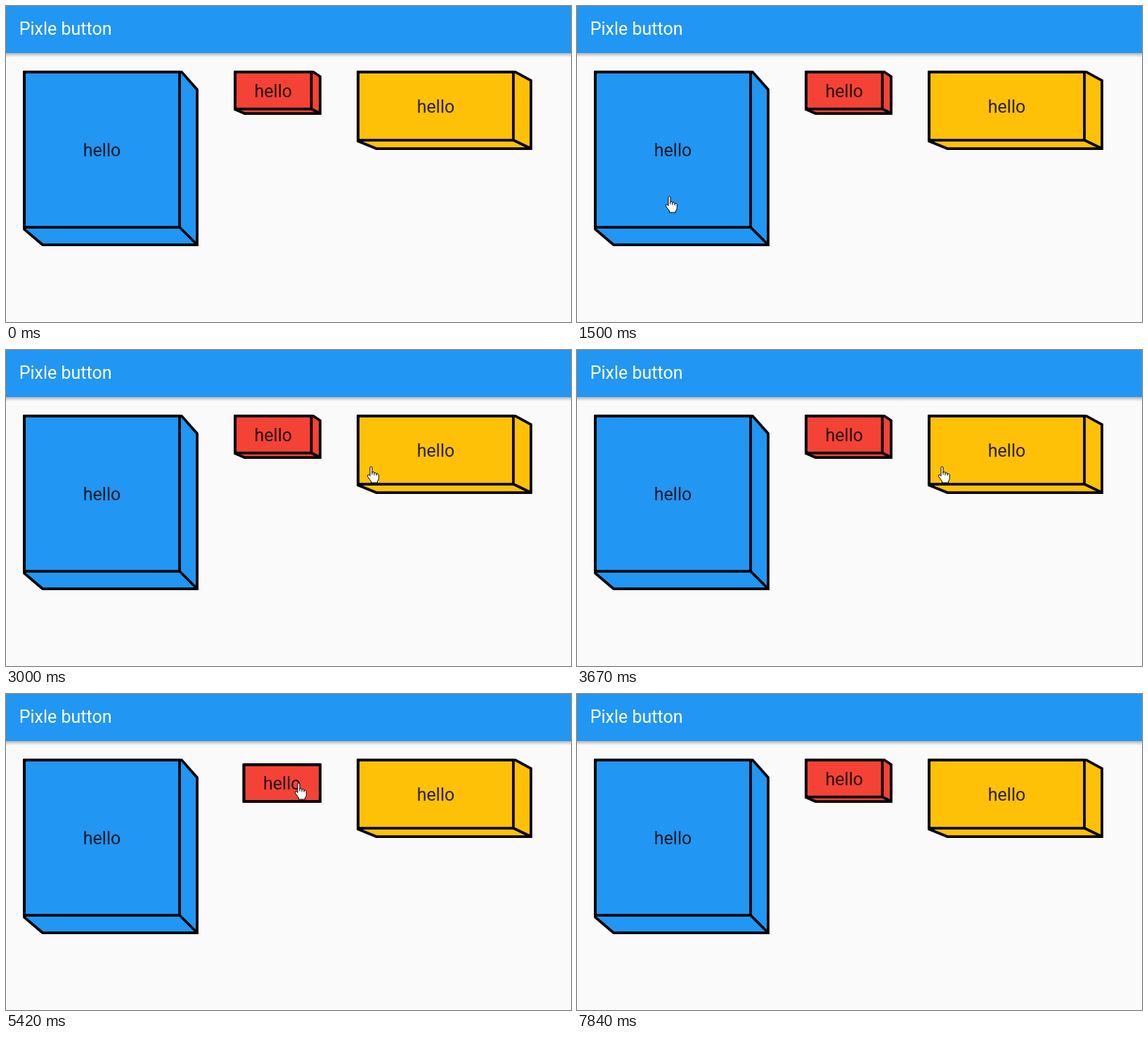
Write an HTML page with a canvas that moves like this. It is 804 px wide and 450 px high and loops after 7890 ms.

```html
<!DOCTYPE html>
<html lang="en">
<head>
<meta charset="utf-8">
<title>Pixle button</title>
<style>
html, body { margin: 0; width: 100%; height: 100%; overflow: hidden; background: #fafafa; }
canvas { display: block; }
</style>
</head>
<body>
<canvas id="stage" width="804" height="450"></canvas>
<script>
const ctx = document.getElementById('stage').getContext('2d');
const LOOP = 7890, FPS = 24;
const TRAVEL = 100, HOLD = 200; // a press: time to sink, time until release
const BLUE = '#2196f3', PAPER = '#fafafa';

// Front face position and size, depth, and the time of the click.
const buttons = [
  { x: 26, y: 94, w: 221, h: 221, dx: 25, dy: 25, color: BLUE, click: 1025 },
  { x: 326, y: 94, w: 108.5, h: 52.5, dx: 12.5, dy: 6.5, color: '#f44336', click: 5230 },
  { x: 501, y: 94, w: 221, h: 97, dx: 25, dy: 12, color: '#ffc107', click: 3190 }
];

// The cursor enters, visits each button and leaves; bow bends a path downwards.
const entry = { x: 530, y: 202 };
const moves = [
  { start: 83, end: 250, x: 131, y: 270, bow: 60 },
  { start: 2000, end: 2405, x: 519, y: 165, bow: 25 },
  { start: 3670, end: 4630, x: 416, y: 126, bow: 0 },
  { start: 6000, end: 7000, x: 125, y: 453, bow: 0 }
];

const arrow = new Path2D('M0 0V17L4 13.2L6.6 19.2L9.4 18L6.8 12H12Z');
const hand = new Path2D('M-1.5 1.5Q0 -.8 1.5 1.5V9Q2.7 7 4.5 8.8V10Q6 8.2 7.6 10V11.2' +
  'Q9 9.8 10.8 11.8V17Q10.8 20 9 21.5V23.5H0V21.5L-5 14.5Q-5.5 11.5 -3 12.3L-1.5 14Z');
const knuckles = new Path2D('M1.5 8V12M4.5 9.5V13M7.6 10.5V13.5');

const progress = (t, start, duration) => Math.min(1, Math.max(0, (t - start) / duration));
const easeOut = u => 1 - (1 - u) ** 3;
const pressAt = (b, t) => progress(t, b.click, TRAVEL) - progress(t, b.click + HOLD, TRAVEL);

function cursorAt(t) {
  let { x, y } = entry;
  for (const m of moves) {
    const k = easeOut(progress(t, m.start, m.end - m.start));
    x += (m.x - x) * k;
    y += (m.y - y) * k + m.bow * Math.sin(Math.PI * k);
  }
  return { x: Math.round(x), y: Math.round(y) };
}

function label(text, x, y, align, color) {
  ctx.font = '25px Roboto, sans-serif';
  ctx.textAlign = align;
  ctx.fillStyle = color;
  ctx.fillText(text, x, y);
}

function drawHeader() {
  const shadow = ctx.createLinearGradient(0, 67, 0, 73);
  shadow.addColorStop(0, 'rgba(0, 0, 0, .28)');
  shadow.addColorStop(1, 'rgba(0, 0, 0, 0)');
  ctx.fillStyle = shadow;
  ctx.fillRect(0, 67, 804, 6);
  ctx.fillStyle = BLUE;
  ctx.fillRect(0, 0, 804, 67);
  label('Pixle button', 18.7, 41, 'left', '#fff');
}

function drawButton(b, t) {
  const press = pressAt(b, t), rest = 1 - press;
  const x = b.x + b.dx * press, y = b.y + b.dy * press;
  const right = x + b.w, bottom = y + b.h;
  const farX = b.x + b.w + b.dx, farY = b.y + b.h + b.dy;

  ctx.fillStyle = b.color;
  ctx.strokeStyle = '#000';
  ctx.lineWidth = 3.75;
  ctx.lineJoin = 'miter';
  ctx.beginPath();
  ctx.moveTo(x, y);
  ctx.lineTo(right + 3 * rest, y);
  ctx.lineTo(farX, y + b.dy * rest);
  ctx.lineTo(farX, farY);
  ctx.lineTo(x + (b.dx + 1) * rest, farY);
  ctx.lineTo(x, bottom + b.dy * .12 * rest);
  ctx.closePath();
  ctx.fill();
  ctx.stroke();

  ctx.lineJoin = 'round';
  ctx.beginPath();
  ctx.rect(x, y, b.w, b.h);
  ctx.moveTo(right, bottom);
  ctx.lineTo(farX, farY);
  ctx.stroke();
  label('hello', x + b.w / 2, y + b.h / 2 + 9.5, 'center', 'rgba(0, 0, 0, .84)');
}

function drawCursor(t) {
  if (t < moves[0].start) return;
  const p = cursorAt(t);
  if (p.y > 450 || t > moves.at(-1).end) return;
  const hovering = buttons.some(b =>
    p.x >= b.x && p.x <= b.x + b.w + b.dx && p.y >= b.y && p.y <= b.y + b.h + b.dy);
  const shape = hovering ? hand : arrow;
  ctx.save();
  ctx.translate(p.x + .5, p.y + .5);
  ctx.fillStyle = '#fff';
  ctx.strokeStyle = '#000';
  ctx.lineWidth = 1;
  ctx.fill(shape);
  ctx.stroke(shape);
  if (hovering) ctx.stroke(knuckles);
  ctx.restore();
}

function render() {
  const elapsed = performance.now() % LOOP;
  const t = Math.floor(elapsed * FPS / 1000 + .01) * 1000 / FPS + .5;
  ctx.fillStyle = PAPER;
  ctx.fillRect(0, 0, 804, 450);
  drawHeader();
  buttons.forEach(b => drawButton(b, t));
  drawCursor(t);
  requestAnimationFrame(render);
}
render();
</script>
</body>
</html>
```
